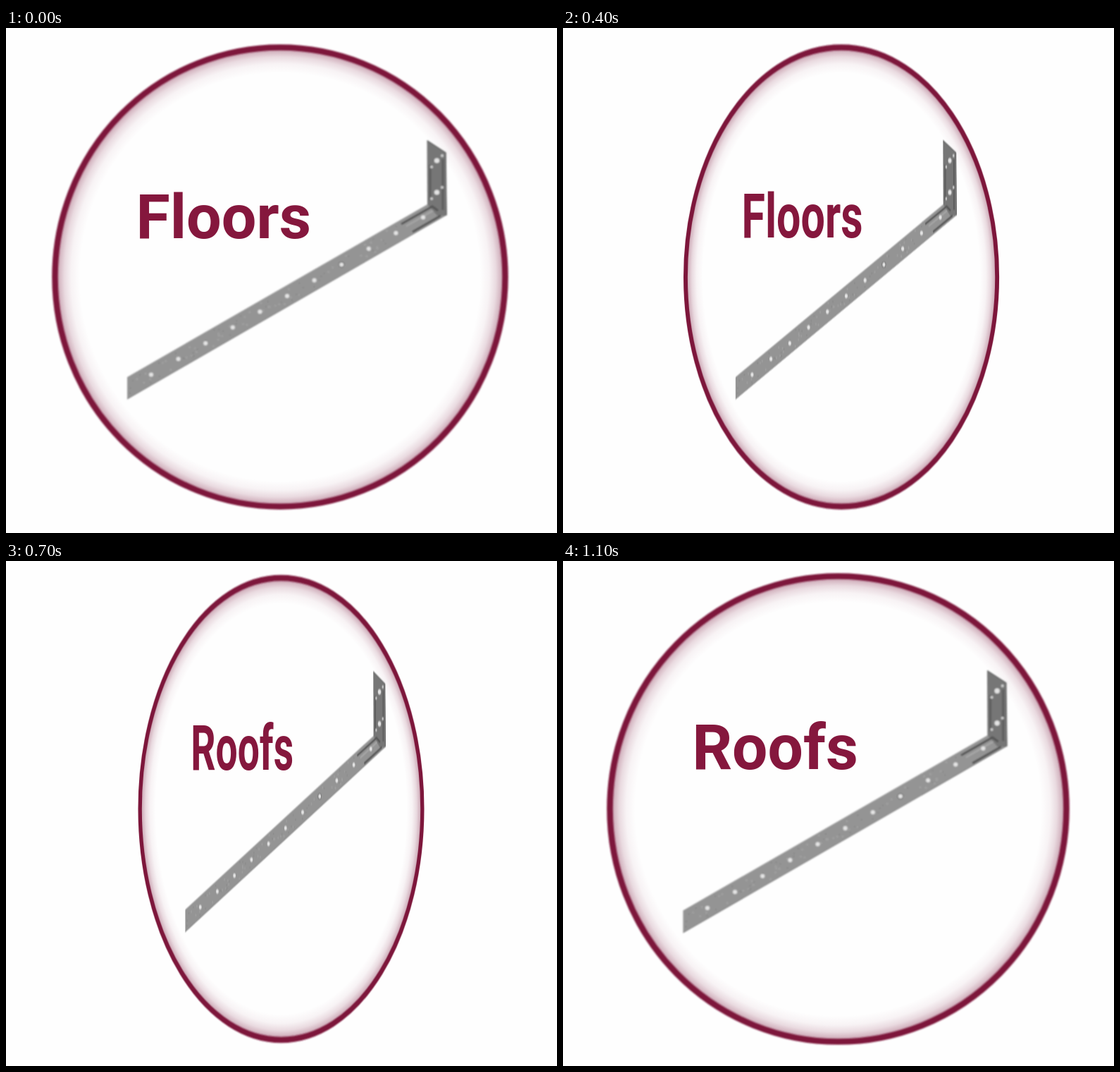
Write an HTML page that moves like this. It is 782x716 px and loops after 1.2 s.

```html
<!DOCTYPE html>
<html lang="en">
<head>
<meta charset="utf-8">
<title>Turning badge</title>
<style>
  html, body { margin: 0; width: 100%; height: 100%; overflow: hidden; background: #fefefe; }
  svg { display: block; width: 100vw; height: 100vh; }
  text { font: 700 88px Roboto, Arial, sans-serif; fill: #85173d; }
</style>
</head>
<body>
<svg viewBox="0 0 782 716">
  <defs>
    <radialGradient id="glow">
      <stop offset=".89" stop-color="#7d1f42" stop-opacity="0"/>
      <stop offset=".93" stop-color="#7d1f42" stop-opacity=".05"/>
      <stop offset=".96" stop-color="#7d1f42" stop-opacity=".16"/>
      <stop offset=".985" stop-color="#7d1f42" stop-opacity=".34"/>
    </radialGradient>
    <filter id="ringBlur"><feGaussianBlur/></filter>
    <filter id="steelBlur"><feGaussianBlur/></filter>
  </defs>
  <g id="badge">
    <ellipse cx="389" cy="353" rx="319" ry="325" fill="url(#glow)"/>
    <ellipse id="ring" cx="389" cy="353" ry="325.5" fill="none" stroke="#7d183b" filter="url(#ringBlur)"/>
    <text id="label" x="184.5" y="297.5"></text>
    <g filter="url(#steelBlur)">
      <path d="M172 495L600 249L624 266L172 526.5Z" fill="#949494"/>
      <path d="M172 526L624 265.5" stroke="#808080"/>
      <path d="M597.5 159L624 176.5L625.5 266L612 266L598 250Z" fill="#767676"/>
      <path d="M598 160L624 177L625 265" fill="none" stroke="#686868" stroke-width="1.5"/>
      <path d="M602 194V244M620 186V258" stroke="#5d5d5d" stroke-width="3"/>
      <path d="M561 278L605 253L613 259M577 289L617 266" fill="none" stroke="#555" stroke-width="3"/>
      <path d="M568 281L606 259" stroke="#aaa" stroke-width="2"/>
      <g id="holes"></g>
    </g>
  </g>
</svg>
<script>
const STEP = 100, STEPS = 12, LAST = STEPS - 1;
const byId = id => document.getElementById(id);
const badge = byId("badge"), ring = byId("ring"), label = byId("label");
const ringBlur = byId("ringBlur").firstElementChild;
const steelBlur = byId("steelBlur").firstElementChild;

function setAll(element, attributes) {
  for (const [key, value] of Object.entries(attributes)) element.setAttribute(key, value);
}

function addHole(cx, cy, r, fill) {
  const hole = document.createElementNS("http://www.w3.org/2000/svg", "circle");
  setAll(hole, { cx, cy, r, fill });
  byId("holes").append(hole);
}

let seed = 7;
const random = () => (seed = seed * 16807 % 2147483647) / 2147483647;

function drawHoles() {
  // Zinc speckle along the strap
  for (let i = 0; i < 90; i++) {
    const x = 176 + 380 * random();
    addHole(x, 495 - 0.575 * (x - 172) + 4 + 23 * random(), 1.4, random() < 0.5 ? "#8a8a8a" : "#a2a2a2");
  }
  for (let i = 0; i < 11; i++) {
    const x = 206 + 38.6 * i, y = 491.5 - 22.3 * i;
    if (i === 7) addHole(x, y, 4.5, "#727272");
    addHole(x, y, 3, "#e4e4e4");
  }
  for (let i = 0; i < 2; i++) {
    const y = 188 + 45 * i;
    addHole(611.5, y, 3.6, "#e4e4e4");
    addHole(604, y + 9, 2, "#d0d0d0");
    addHole(619, y - 7, 2, "#d0d0d0");
  }
}

// The badge speeds up to edge-on, swaps its label, then slows down to face the viewer
function pose(step) {
  const front = step < STEPS / 2;
  const n = front ? step : LAST - step;
  const degrees = front ? 7.6 * n + 0.247 * n ** 3 : 7.1 * n + 0.36 * n ** 3;
  const nearEdge = degrees > 60;
  const size = front ? 1 : 1.014 - 0.0005 * n * n;
  return {
    front, nearEdge,
    cx: front ? 389 + 16.5 * (n / 5) ** 4.5 : 390.5,
    cy: front ? 353 : 351.5,
    sx: size * Math.cos(degrees * Math.PI / 180),
    sy: nearEdge ? 1.122 : size
  };
}

function render(time) {
  const { front, nearEdge, cx, cy, sx, sy } = pose(Math.floor(time / STEP) % STEPS);
  badge.setAttribute("transform", `translate(${cx} ${cy}) scale(${sx} ${sy}) translate(-389 -353)`);
  setAll(ring, {
    rx: nearEdge ? 310 : 319.5,
    "stroke-width": nearEdge ? 23 : 8.5,
    "stroke-opacity": nearEdge ? 0.62 : 1
  });
  ringBlur.setAttribute("stdDeviation", nearEdge ? 4 : 0.9);
  steelBlur.setAttribute("stdDeviation", nearEdge ? 2 : 0.9);
  label.textContent = front ? "Floors" : "Roofs";
}

drawHoles();
const start = performance.now();
function tick() {
  render(performance.now() - start);
  requestAnimationFrame(tick);
}
tick();
</script>
</body>
</html>
```
